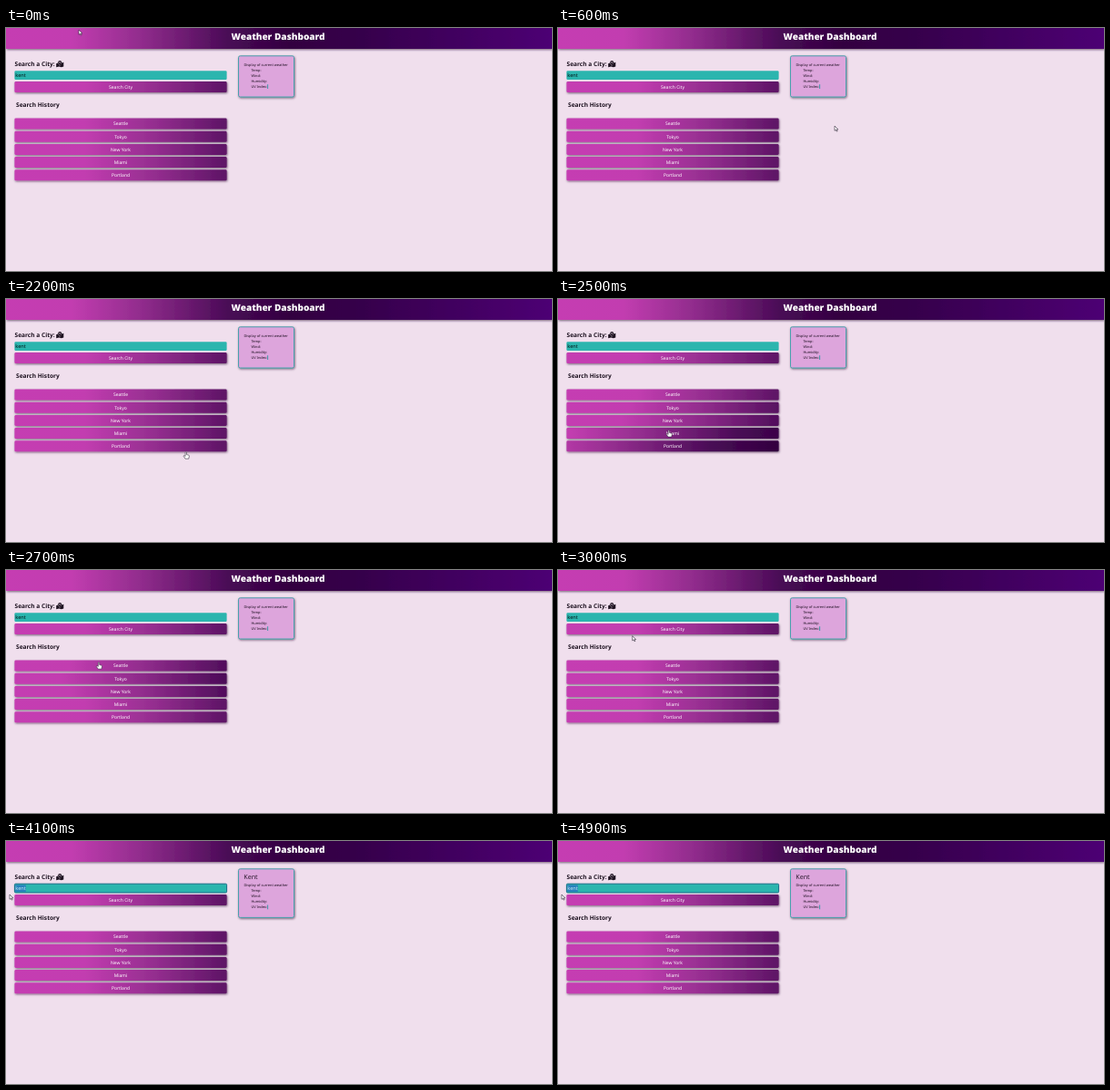
An HTML page that plays this animation: 600x268 px, repeating every 5 s.

```html
<!DOCTYPE html>
<html lang="en">
<head>
<meta charset="utf-8">
<title>Weather Dashboard</title>
<style>
  html, body { margin: 0; width: 100%; height: 100%; overflow: hidden; background: #f0dfed; }
  svg { display: block; width: 600px; height: 268px; }
  text { font-family: "Noto Sans", "Open Sans", sans-serif; text-rendering: geometricPrecision; }
  .title { font: 800 10px "Open Sans", "Noto Sans", sans-serif; fill: #fff; text-anchor: middle; }
  .heading { font-size: 6.6px; font-weight: 700; fill: #1d1220; }
  .label { font-size: 5px; font-weight: 500; fill: #fff; text-anchor: middle; }
  .small { font-size: 3.9px; fill: #1d1020; }
</style>
</head>
<body>
<svg id="stage" viewBox="0 0 600 268">
  <defs id="defs">
    <linearGradient id="bar">
      <stop offset="0" stop-color="#c53eb2"/>
      <stop offset=".12" stop-color="#c23db0"/>
      <stop offset=".25" stop-color="#902c8c"/>
      <stop offset=".41" stop-color="#480a55"/>
      <stop offset=".52" stop-color="#330040"/>
      <stop offset=".64" stop-color="#35004a"/>
      <stop offset="1" stop-color="#4d0074"/>
    </linearGradient>
    <filter id="shadow" x="-10%" y="-30%" width="120%" height="180%">
      <feDropShadow dx=".7" dy="1.1" stdDeviation=".9" flood-color="#2b1030" flood-opacity=".6"/>
    </filter>
  </defs>

  <rect width="600" height="268" fill="#f0dfed"/>
  <rect width="600" height="23" fill="url(#bar)" filter="url(#shadow)"/>
  <text class="title" x="299" y="13.4">Weather Dashboard</text>

  <text class="heading" x="9.5" y="42">Search a City:</text>
  <g fill="#1d1220">
    <path d="M55.2 39.2l1.8-.7 2.1 3.2 2-3.2 2.2-.7v4.6l-2.4.8-2.7-.8-3 .8z"/>
    <path fill-rule="evenodd" d="M59.2 41.2c-1.3-1.6-2-2.3-2-3.2a2 2 0 0 1 4 0c0 .9-.7 1.6-2 3.2zm0-2.5a.7.7 0 1 0 0-1.4.7.7 0 0 0 0 1.4z"/>
  </g>

  <rect id="input" x="9.4" y="47.2" width="233.2" height="9.8" rx="1.2" fill="#2bb5ae"/>
  <rect id="selection" y="48.4" height="7.6" fill="#2782bd"/>
  <text id="query" x="10.2" y="54" font-size="5.6" font-weight="500">kent</text>

  <g id="buttons"></g>
  <text class="heading" x="11" y="86.8">Search History</text>

  <rect id="card" x="255.5" y="30.8" width="61" rx="1.8" fill="#dda5dc" stroke="#3a9fa8" stroke-width=".9" filter="url(#shadow)"/>
  <text id="city" x="261.3" y="42" font-size="7.1" font-weight="500" fill="#2d1b30">Kent</text>
  <g id="details" class="small">
    <text x="261.4" y="42.2">Display of current weather</text>
    <rect x="287.2" y="62.2" width=".9" height="4.8" fill="#2f9aa5"/>
  </g>

  <g id="cursor" stroke-linejoin="round">
    <path id="arrow" d="M0 0v5.3l1.3-1.1.9 1.9.9-.4-.9-1.8h1.7z" fill="#fff" stroke="#302838" stroke-width=".6"/>
    <path id="hand" transform="scale(1.15)" d="M-.6 .4q.6-.8 1.2 0v2.2l2.1.6q.5.2.4.8l-.5 2.6h-3.3l-1.7-2.6q.2-.8 1-.3l.8.6z" fill="#fff" stroke="#302838" stroke-width=".5"/>
    <path id="beam" d="M-1.2-2.8h2.4M0-2.8v5.6M-1.2 2.8h2.4" fill="none" stroke="#16343a" stroke-width=".7"/>
  </g>
</svg>
<script>
  const LOOP = 5000, STEP = 100;
  const FOCUS_AT = 3500, RESULT_AT = 4100;
  const LEFT = 9.4, WIDTH = 233.2;
  // Buttons show a window of the bar gradient, which slides along on hover.
  const SPREAD = WIDTH * 2.75, SLIDE = SPREAD * .16, FADE = 120;
  const $ = id => document.getElementById(id);

  function add(parent, tag, attrs, text = '') {
    const node = document.createElementNS('http://www.w3.org/2000/svg', tag);
    for (const key in attrs) node.setAttribute(key, attrs[key]);
    node.textContent = text;
    return parent.appendChild(node);
  }

  ['Temp:', 'Wind:', 'Humidity:', 'UV Index:'].forEach((line, i) =>
    add($('details'), 'text', { x: 269.4, y: 48.1 + i * 6 }, line));

  // label, top edge, time of strongest highlight
  const buttons = [
    ['Search City', 59, 3150],
    ['Seattle', 99.5, 2800],
    ['Tokyo', 113.7, 2610],
    ['New York', 127.9, 2600],
    ['Miami', 142, 2535],
    ['Portland', 156.2, 2500]
  ].map(([label, y, peak], i) => {
    const paint = add($('defs'), 'linearGradient',
      { id: 'paint' + i, href: '#bar', gradientUnits: 'userSpaceOnUse' });
    add($('buttons'), 'rect',
      { x: LEFT, y, width: WIDTH, height: 12, rx: 1.3, fill: `url(#paint${i})`, filter: 'url(#shadow)' });
    add($('buttons'), 'text', { class: 'label', x: 126, y: y + 7.8 }, label);
    return { paint, peak };
  });

  // time, x, y of the pointer's hot spot
  const path = [
    [0, 80, 2], [600, 304, 108], [1900, 304, 108], [2200, 197.8, 168.6],
    [2500, 121.8, 144.5], [2700, 102, 101.6], [3100, 75, 63], [3300, 67, 54],
    [3700, 67, 54], [4000, 4, 59], [LOOP, 4, 59]
  ];

  function pointerAt(t) {
    const i = path.findIndex(key => key[0] > t);
    const [t0, x0, y0] = path[i - 1], [t1, x1, y1] = path[i];
    const k = (t - t0) / (t1 - t0);
    return [x0 + (x1 - x0) * k, y0 + (y1 - y0) * k];
  }

  function pointerShape(x, y) {
    if (x < 9 || x > 243) return 'arrow';
    if (y > 47 && y < 57.5) return 'beam';
    return (y > 59 && y < 71) || (y > 99 && y < 169.5) ? 'hand' : 'arrow';
  }

  const show = (id, on) => $(id).setAttribute('visibility', on ? 'visible' : 'hidden');

  function draw(t) {
    const [x, y] = pointerAt(t);
    const shape = pointerShape(x, y);
    $('cursor').setAttribute('transform', `translate(${x} ${y})`);
    for (const id of ['arrow', 'hand', 'beam']) show(id, id === shape);

    for (const { paint, peak } of buttons) {
      const glow = Math.max(0, 1 - Math.abs(t - peak) / FADE);
      const from = LEFT - SLIDE * glow;
      paint.setAttribute('x1', from);
      paint.setAttribute('x2', from + SPREAD);
    }

    const focused = t >= FOCUS_AT;
    $('input').setAttribute('stroke', focused ? '#176c86' : 'none');
    const left = Math.max(10.2, Math.min(21.8, x));
    const width = focused ? 21.8 - left : 0;
    $('selection').setAttribute('x', left);
    $('selection').setAttribute('width', width);
    $('query').setAttribute('fill', width > 0 ? '#c4e5f2' : '#06191c');

    const found = t >= RESULT_AT;
    show('city', found);
    $('card').setAttribute('height', found ? 53.6 : 45.2);
    $('details').setAttribute('transform', `translate(0 ${found ? 8.3 : 0})`);
  }

  const start = performance.now();
  function tick() {
    const t = (performance.now() - start) % LOOP;
    draw(Math.floor(t / STEP) * STEP);
    requestAnimationFrame(tick);
  }
  tick();
</script>
</body>
</html>
```
